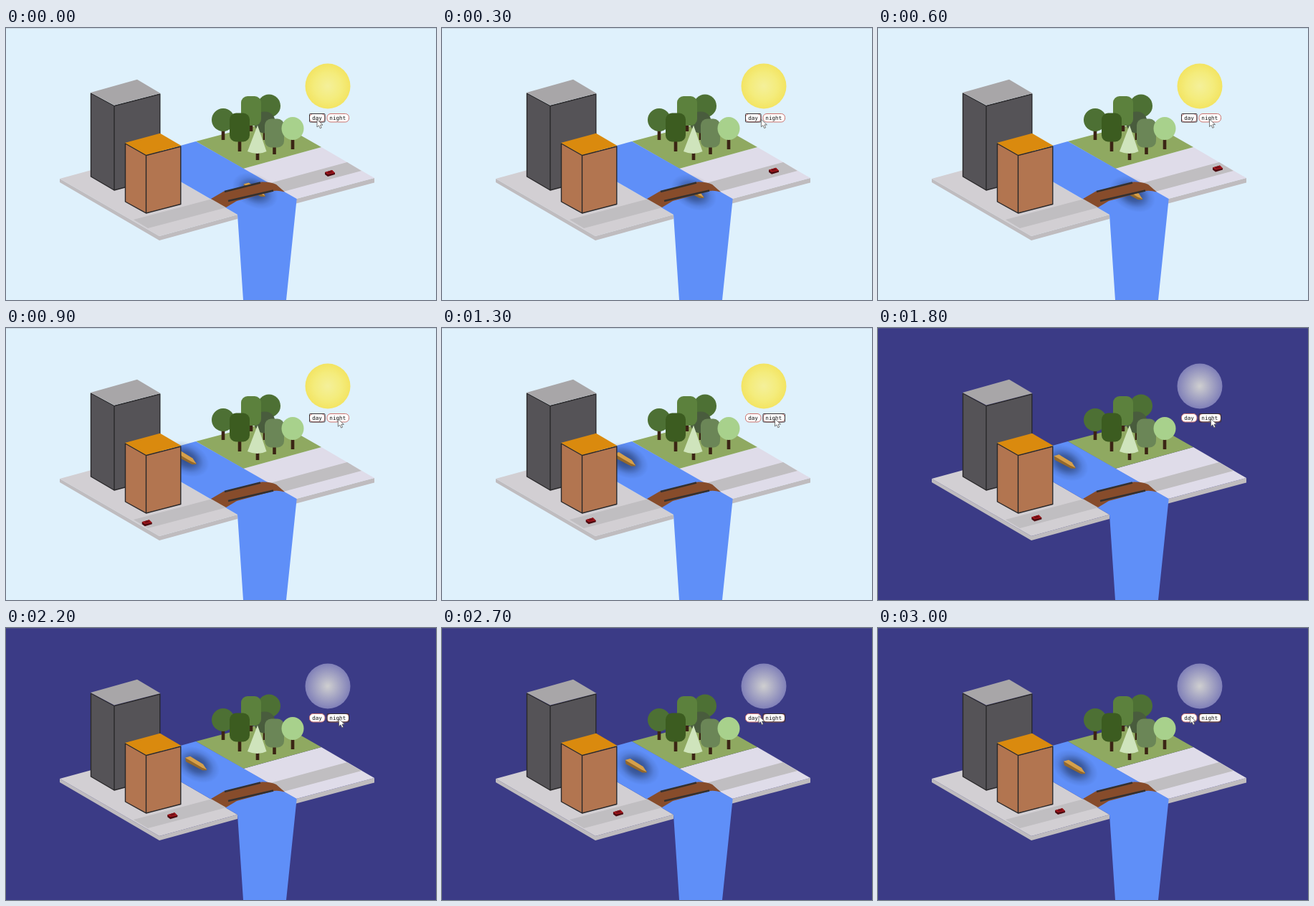
Write an HTML page that moves like this. It is 600 px wide and 379 px high and loops after 3.1 s.

```html
<!DOCTYPE html>
<html lang="en">
<head>
<meta charset="utf-8">
<title>Day and night town</title>
<style>
  html, body { margin: 0; width: 100%; height: 100%; overflow: hidden; }
  svg { display: block; width: 600px; height: 379px; background: #dff1fc; }
  svg.night { background: #3b3b86; }
  .top { fill: #d2cfd3; }
  .side { fill: #bfbcbf; }
  .road { fill: #c0bec1; }
  .water { fill: #5f8ff8; }
  .wall { stroke: #29282a; stroke-width: 1.4; stroke-linejoin: round; }
  .rail { stroke: #33302f; stroke-width: 2.4; }
  .trunk { stroke: #3b2414; stroke-width: 4.6; }
  .button rect { fill: #fff; stroke: #c9706c; stroke-width: 1; }
  .button .ring { display: none; }
  .button.focus .ring { display: inline; fill: none; stroke: #3a3234; }
  .button text { font: 7.6px "DejaVu Sans Mono", monospace; fill: #111; text-anchor: middle; }
</style>
</head>
<body>
<svg id="scene" viewBox="0 0 600 379">
  <defs>
    <radialGradient id="sun">
      <stop offset="0" stop-color="#f4f09a"/>
      <stop offset=".6" stop-color="#f4ec7c"/>
      <stop offset="1" stop-color="#f3e462"/>
    </radialGradient>
    <radialGradient id="moon">
      <stop offset="0" stop-color="#cfcfd0"/>
      <stop offset="1" stop-color="#8080b8"/>
    </radialGradient>
    <radialGradient id="shade">
      <stop offset="0" stop-color="#14203c" stop-opacity=".62"/>
      <stop offset=".4" stop-color="#14203c" stop-opacity=".45"/>
      <stop offset=".75" stop-color="#14203c" stop-opacity=".12"/>
      <stop offset="1" stop-color="#14203c" stop-opacity="0"/>
    </radialGradient>
  </defs>
  <rect width="600" height="1" fill="#808090" opacity=".25"/>
  <circle id="orb" cx="449" cy="81" r="31.5"/>

  <!-- ground and river -->
  <path class="side" d="M75 210 214 290 323 260V266L214 296 75 215ZM405 238 514 209V215.500L405 244.500Z"/>
  <path class="top" d="M75 210 185 180 323 260 214 290Z"/>
  <path fill="#dfdce9" d="M331 196 440 166 514 209 405 238Z"/>
  <path fill="#8fa961" d="M265 158 375 129 440 166 331 196Z"/>
  <path class="water" d="M185 180 265 158 405.700 238 391 379H331L323 260Z"/>
  <path class="road" d="M178 267 288 238 308 250 198 279ZM367 216.500 476 187 496 199 387 228Z"/>

  <g id="boat">
    <ellipse cx="-14" cy="-8" rx="34" ry="23" transform="rotate(27 -14 -8)" fill="url(#shade)"/>
    <path fill="#93682c" d="M-30-17.500 0-2V0L-6 0-29-12Z"/>
    <path fill="#d6a04a" d="M-30-17.500-23-19.500-5-8.500 0-1-7-4Z"/>
  </g>

  <!-- bridge -->
  <path fill="#874c2b" d="M286 238 304 227.500 357 214.500Q369 214 377 218L389 228.500Q380 226 374 227L322 241 307 250Z"/>
  <path class="rail" d="M305 228 355 215.500M310 241 373 226.500"/>

  <g id="car">
    <path fill="#4d0b10" d="M-7-1 3-4 7 0V2L-3 5-7 2Z"/>
    <path fill="#a5161c" d="M-7-1 3-4 7 0-3 2Z"/>
    <path fill="#6f0f15" d="M-4-1.500 2-3 4-1-2 .5Z"/>
  </g>

  <!-- buildings -->
  <path class="wall" fill="#555357" d="M118.500 91 151 108.500V226L118.500 207ZM151 108.500 214.800 92V209L151 226Z"/>
  <path fill="#a8a6a8" d="M118 90 183 71.800 215.500 91 151 107.500Z"/>
  <path class="wall" fill="#b27550" d="M166.500 161 195.500 177.500V258L166.500 242ZM195.500 177.500 243.800 165V245.500L195.500 258Z"/>
  <path fill="#da8a0e" d="M166 160 215 146.800 244.500 164 195.500 176.700Z"/>

  <g id="trees"></g>

  <g class="button" id="day">
    <rect x="423.500" y="119.500" width="21.500" height="11.500" rx="5"/>
    <rect class="ring" x="423.500" y="119.500" width="21.500" height="11.500" rx="1"/>
    <text x="434" y="127.500">day</text>
  </g>
  <g class="button" id="night">
    <rect x="448" y="119.500" width="30.500" height="11.500" rx="5"/>
    <rect class="ring" x="448" y="119.500" width="30.500" height="11.500" rx="1"/>
    <text x="462.800" y="127.500">night</text>
  </g>

  <path id="cursor" fill="#fff" stroke="#555" stroke-width=".8" d="M0 0V10.500L2.500 8.300 4.300 12.300 6.200 11.500 4.500 7.600H8Z"/>
</svg>
<script>
const LOOP = 3100, STEP = 100, RESTART = 700, PRESS = 1300, NIGHTFALL = 1400;
const el = id => document.getElementById(id);
const place = (id, x, y) => el(id).setAttribute("transform", `translate(${x} ${y})`);

// x, crown centre y, half width, half height, corner radius, trunk end, colour
const trees = [
  [367, 108.500, 16, 16, 16, 130, "#4d7034"],
  [361, 131.500, 14.500, 15, 14, 156, "#495c3d"],
  [342, 115.500, 14, 20.500, 9, 144, "#5c813d"],
  [303, 128, 16, 16, 16, 156, "#4d7034"],
  [326, 138.500, 14, 20, 9, 172, "#3c5c20"],
  [374.500, 146.500, 13.500, 20, 9, 176, "#6b8657"],
  [400, 140, 15.500, 16, 16, 169, "#a8d18c"]
];
const trunk = (x, y, end) => `<path class="trunk" d="M${x} ${y}V${end}"/>`;
el("trees").innerHTML = trees.map(([x, y, w, h, r, end, color]) =>
  trunk(x, y, end) +
  `<rect x="${x - w}" y="${y - h}" width="${2 * w}" height="${2 * h}" rx="${r}" fill="${color}"/>`
).join("") + trunk(351, 165, 184) +
  '<path fill="#cfe4bc" d="M351 135.500 363.500 172Q351 178 337 172Z"/>';

// time, x, y
const cursorPath = [
  [0, 434, 127.500], [100, 434, 127.500], [600, 462.500, 127], [1300, 464.500, 126.500],
  [2400, 464.500, 126.500], [2700, 442, 122.500], [3000, 435.500, 122.500]
];
function along(path, t) {
  const i = path.findIndex(p => p[0] >= t);
  if (i < 1) return path[0].slice(1);
  const [a, b] = [path[i - 1], path[i]];
  const k = (t - a[0]) / (b[0] - a[0]);
  return [1, 2].map(n => a[n] + (b[n] - a[n]) * k);
}

function draw(now) {
  const t = Math.floor(now % LOOP / STEP) * STEP;
  const s = t - RESTART;
  if (s < 0) {
    place("car", 452 + t * .0367, 202 - t * .0108);
    place("boat", 361.500 + t * .0125, 235 + t * .007);
  } else {
    place("car", 191.300 + s * .0273, 272.900 - s * .00775);
    place("boat", 263.200 + s * .0112, 188.800 + s * .0063);
  }
  place("cursor", ...along(cursorPath, t));
  el("day").classList.toggle("focus", t < PRESS);
  el("night").classList.toggle("focus", t >= PRESS);
  const dark = t >= NIGHTFALL;
  el("scene").classList.toggle("night", dark);
  el("orb").setAttribute("fill", dark ? "url(#moon)" : "url(#sun)");
  requestAnimationFrame(draw);
}
draw(performance.now());
</script>
</body>
</html>
```
